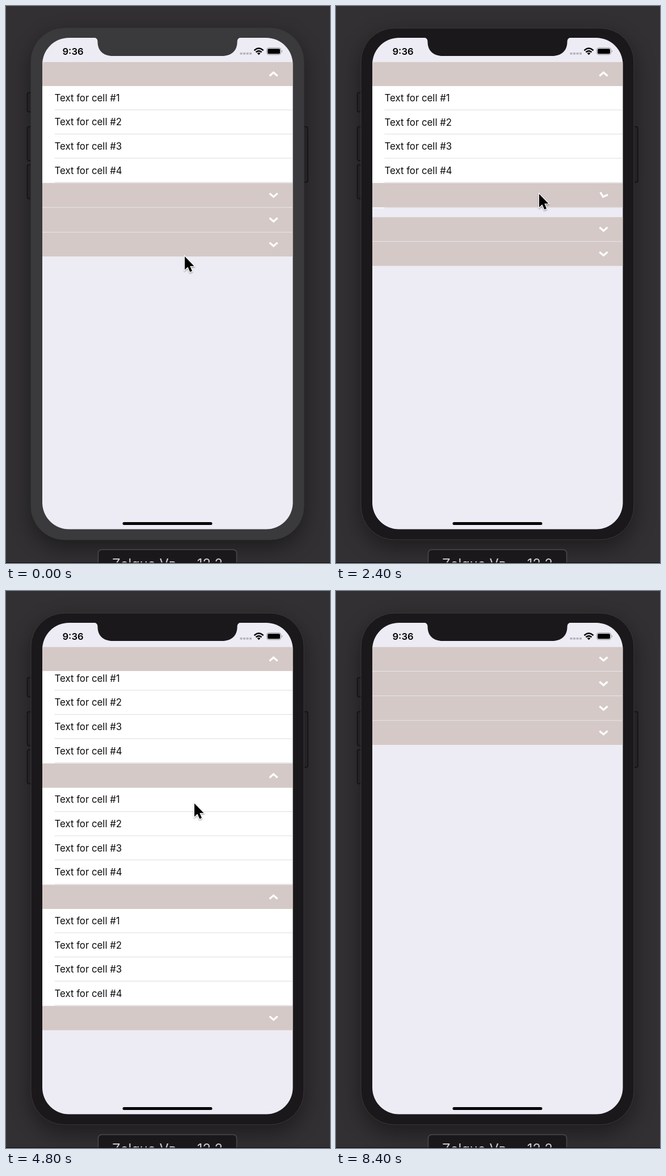
These frames come from a looping animation (571 by 981 pixels, 9200 ms). An HTML page:

```html
<!DOCTYPE html>
<html lang="en">
<head>
<meta charset="utf-8">
<title>Collapsible table sections</title>
<style>
  html, body { margin: 0; width: 100%; height: 100%; overflow: hidden; background: #323032; }
  svg { display: block; }
  text { font-family: Inter, Roboto, sans-serif; }
  .button { fill: #242225; stroke: #121013; stroke-width: 1.5; }
  .row { font-size: 16.8px; fill: #0b0a0d; }
</style>
</head>
<body>
<svg width="571" height="981" viewBox="0 0 571 981">
  <defs>
    <filter id="blur" x="-20%" y="-20%" width="140%" height="140%">
      <feGaussianBlur stdDeviation="19"/>
    </filter>
    <filter id="soft" x="-50%" y="-50%" width="200%" height="200%">
      <feDropShadow dx="0" dy="1.5" stdDeviation="1.2" flood-opacity=".4"/>
    </filter>
  </defs>
  <rect width="571" height="981" fill="#323032"/>
  <rect x="44" y="52" width="481" height="902" rx="60" opacity=".42" filter="url(#blur)"/>

  <g class="button">
    <rect x="37.5" y="152.5" width="12" height="34" rx="3"/>
    <rect x="37.5" y="212.5" width="12" height="60" rx="3"/>
    <rect x="37.5" y="279.5" width="12" height="60" rx="3"/>
    <rect x="520" y="212.5" width="12" height="98" rx="3"/>
  </g>
  <rect id="bezel" x="44" y="39" width="481" height="901" rx="59" stroke="#3a383b"/>
  <rect x="64" y="56" width="441.5" height="865.5" rx="47" fill="#edecf4"/>
  <path id="notch" d="M155 55.5Q161.500 56 161.500 63C161.500 79 172 88 188 88H381C397 88 407.500 79 407.500 63Q407.500 56 414 55.500Z"/>

  <text x="99.500" y="85.600" font-size="16.600" font-weight="600">9:36</text>
  <path d="M412.500 83.800H433" stroke="#b4b2ba" stroke-width="3.400" stroke-dasharray="4 1.500"/>
  <g fill="none" stroke="#000" stroke-width="2.600">
    <path d="M437.500 78.300Q445.500 70.700 453.500 78.300"/>
    <path d="M440.500 81.400Q445.500 76.800 450.500 81.400"/>
  </g>
  <path d="M442.600 83.300Q445.500 80.800 448.400 83.300L445.500 86.300Z"/>
  <rect x="459.500" y="73.700" width="25" height="12" rx="3.500" fill="none" stroke="#97959d"/>
  <rect x="461" y="75.200" width="22" height="9" rx="2"/>
  <path d="M486 77.500Q488.300 79.700 486 82Z" fill="#97959d"/>

  <svg id="list" x="64" y="98.400" width="441.500" height="823"></svg>
  <rect x="205.500" y="909" width="158" height="5" rx="2.500"/>

  <rect x="162.500" y="957.500" width="244" height="40" rx="6" fill="#1a181b" stroke="#4a484b" stroke-width="1.600"/>
  <g font-size="23.600" fill="#d0ced1">
    <text x="187" y="990.500">Zelquo Vʀ</text>
    <text x="382" y="990.500" text-anchor="end">– 12.2</text>
  </g>
  <rect y="980" width="571" height="1" fill="#0c0b0d"/>

  <path id="cursor" d="M0 0V23.500L5.400 18.600L9.300 27.300L13 25.700L9.300 17H16.500Z" stroke="#fff" stroke-width="2.200" paint-order="stroke" filter="url(#soft)"/>
</svg>

<script>
const LOOP = 9200, FOCUS = 300, TOGGLE = 300;
const HEADER = 42.5, ROW = 42.55, ROWS = 4 * ROW, FOOTER = 0.85;
const $ = id => document.getElementById(id);

// time, x, y of the pointer tip
const pointer = [
  [0, 315, 441], [300, 315, 441], [900, 345, 207], [1000, 345, 207], [1400, 364, 509],
  [1500, 364, 509], [2200, 358, 331], [2700, 358, 331], [3000, 352, 425], [3250, 357, 552],
  [4050, 357, 552], [4400, 335, 374], [4800, 332, 374], [5450, 297, 337], [5850, 297, 337],
  [6150, 300, 372], [6300, 300, 372], [6600, 325, 105], [6800, 325, 105], [7000, 350, 157],
  [7200, 313, 251], [7400, 313, 251], [7700, 338, 222], [7900, 338, 222], [8400, 300, 1000],
  [LOOP, 300, 1000]
];
const drags = [{ from: 1000, to: 1400 }, { from: 4050, to: 4400 }];
const sections = [
  { open: true, taps: [6700] },
  { open: false, taps: [2335, 5600] },
  { open: false, taps: [3300, 6250] },
  { open: false, taps: [] }
];

const clamp = v => Math.min(1, Math.max(0, v));
const ease = p => p < 0.5 ? 2 * p * p : 1 - 2 * (1 - p) ** 2;
const move = (el, x, y) => el.setAttribute('transform', `translate(${x} ${y})`);

function pointerAt(t) {
  const i = pointer.findIndex(k => k[0] > t);
  const [t0, x0, y0] = pointer[i - 1], [t1, x1, y1] = pointer[i];
  const p = ease((t - t0) / (t1 - t0));
  return [x0 + (x1 - x0) * p, y0 + (y1 - y0) * p];
}

// Rubber-band resistance while dragging, critically damped return afterwards
function scrollAt(t) {
  const drag = drags.findLast(d => d.from <= t);
  if (!drag) return 0;
  const pull = pointerAt(Math.min(t, drag.to))[1] - pointerAt(drag.from)[1];
  const view = 866, stretch = Math.sign(pull) * view * (1 - 1 / (1 + Math.abs(pull) * 0.55 / view));
  const s = Math.max(0, t - drag.to) / 100;
  return stretch * (1 + s) * Math.exp(-s);
}

// Half turns made by a section's chevron: odd means open
function turnsAt(section, t) {
  return section.taps.reduce((n, tap) => n + ease(clamp((t - tap) / TOGGLE)), section.open ? 1 : 0);
}

function build(section) {
  const rows = [1, 2, 3, 4].map(n => `
    <text class="row" x="21.500" y="${(n - 1) * ROW + 27}">Text for cell #${n}</text>
    <rect x="21.500" y="${n * ROW - 1}" width="420" height="1" fill="#dddce1"/>`).join('');
  $('list').insertAdjacentHTML('beforeend', `
    <svg width="441.500"><g><rect width="441.500" height="${ROWS}" fill="#fff"/>${rows}</g></svg>
    <g><rect width="441.500" height="${HEADER}" fill="#d4c9c6"/>
      <path d="M-7 -3.400L0 2.800L7 -3.400" fill="none" stroke="#fff" stroke-width="3.300"/></g>`);
  section.header = $('list').lastElementChild;
  section.clip = section.header.previousElementSibling;
  section.rows = section.clip.firstElementChild;
  section.chevron = section.header.lastElementChild;
}

function draw(t) {
  const color = t < FOCUS ? '#3a393b' : '#1a181b';
  $('bezel').setAttribute('fill', color);
  $('notch').setAttribute('fill', color);
  move($('cursor'), ...pointerAt(t));

  let y = scrollAt(t);
  for (const s of sections) {
    const turns = turnsAt(s, t);
    const open = 1 - Math.abs(1 - turns);
    s.clip.setAttribute('y', y + HEADER);
    s.clip.setAttribute('height', ROWS * open);
    move(s.rows, 0, ROWS * (open * open - 1));
    move(s.header, 0, Math.max(0, y));
    s.chevron.setAttribute('transform', `translate(407.5 21.4) rotate(${turns * 180})`);
    y += HEADER + ROWS * open + FOOTER;
  }
}

sections.forEach(build);
const start = performance.now();
(function tick() {
  draw((performance.now() - start) % LOOP);
  requestAnimationFrame(tick);
})();
</script>
</body>
</html>
```
